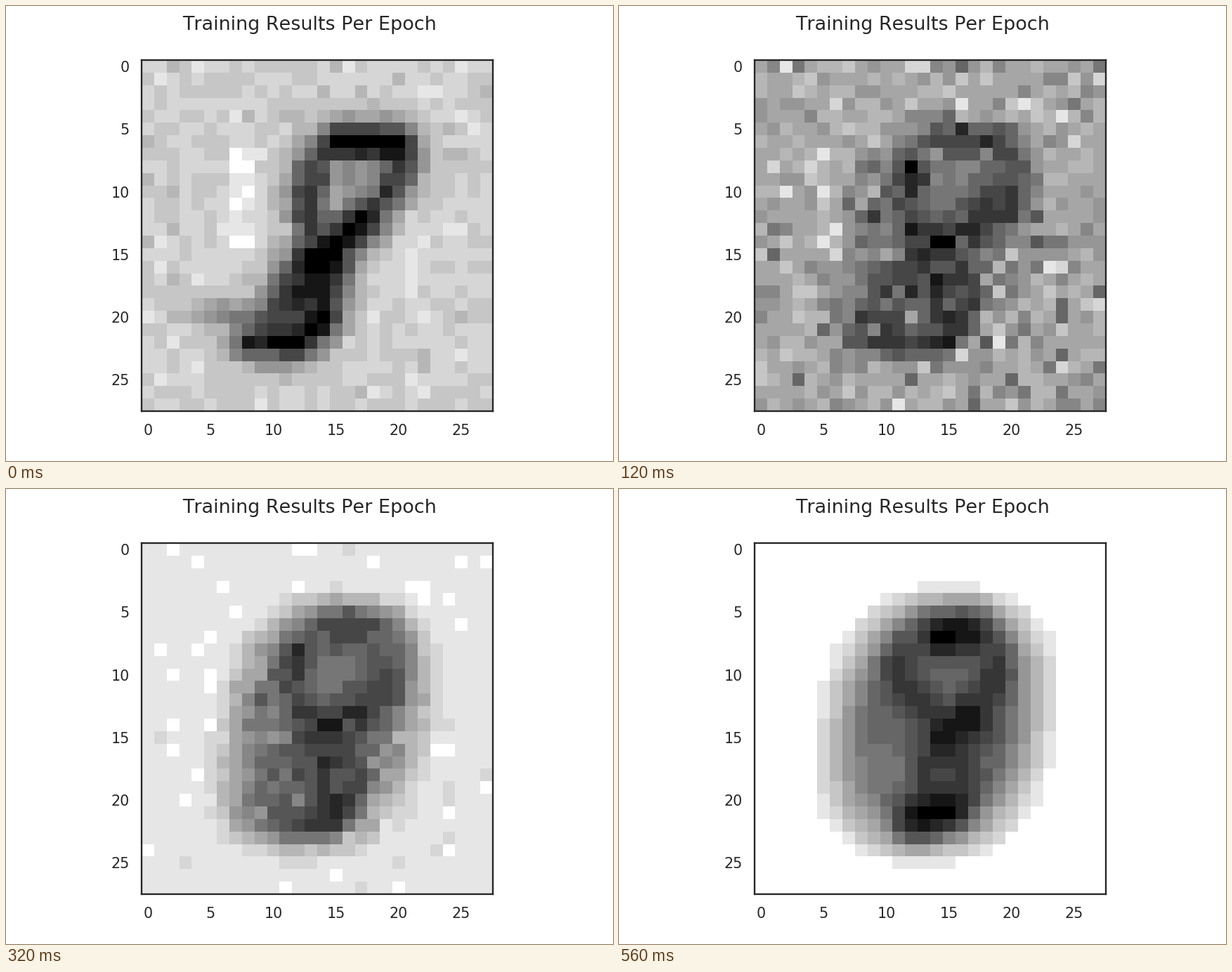
A matplotlib script that plays this animation: 864x648 px, repeating every 600 ms.

```python
import numpy as np
import matplotlib.pyplot as plt
from matplotlib.animation import FuncAnimation

SIZE = 28
FRAMES = 15
STAGE = 864, 648
INK = "#262626"
Y, X = np.mgrid[0:SIZE, 0:SIZE].astype(float)


def stroke(path, width, amp):
    """Soft line through the points of path; a negative amp lightens."""
    dist = np.full(X.shape, np.inf)
    for (x0, y0), (x1, y1) in zip(path, path[1:] or path):
        dx, dy = x1 - x0, y1 - y0
        t = ((X - x0) * dx + (Y - y0) * dy) / max(dx * dx + dy * dy, 1e-9)
        t = np.clip(t, 0, 1)
        dist = np.minimum(dist, np.hypot(X - x0 - t * dx, Y - y0 - t * dy))
    return amp * np.exp(-(dist / width) ** 2)


def eight(cx, lean, top, bottom, height=8):
    """Path of a leaning 8 with loops of half widths top and bottom."""
    t = np.linspace(0, 2 * np.pi, 49)
    s = np.sin(2 * t)
    y = -height * np.cos(t)
    half = np.where(y < 0, top, bottom)
    x = cx + lean * y + half * np.sign(s) * np.abs(s) ** 0.6
    return list(zip(x, 14 + y))


def draw(*strokes):
    """Blend dark strokes with a soft maximum, then take the light ones away."""
    layers = [stroke(*s) for s in strokes]
    dark = sum(np.maximum(s, 0) ** 3 for s in layers) ** (1 / 3)
    return dark + sum(np.minimum(s, 0) for s in layers)


def body(lean, a, b=11.4):
    """Leaning rounded blob, 1 inside and fading out towards its rim."""
    dx = X - 14 - lean * (Y - 14)
    rho = (np.abs(dx / a) ** 2.6 + np.abs((Y - 14) / b) ** 2.6) ** (1 / 2.6)
    return np.clip(2.33 * (1 - rho), 0, 1)


def grain(seed):
    """Cell noise with long tails, so that a few cells stand out."""
    g = np.random.default_rng(seed).normal(size=X.shape)
    return np.clip(g * (0.7 + 0.25 * g * g), -3.2, 3.2)


def sharp_digit():
    digit = draw(
        (eight(14.3, -0.4, 3.4, 1.8), 1.8, 9),
        ([(15.5, 6), (20, 6.2)], 1.5, 12),
        ([(17, 12.5), (13.5, 15.5)], 1.9, 11),
        ([(13.5, 16), (12.8, 19)], 2.5, 10),
        ([(14, 20.5), (11.5, 22), (8, 22)], 1.5, 10),
        ([(5, 19.8), (9, 19.8)], 1.2, 5),
        ([(16.5, 9)], 2, 4),
        ([(7.7, 7), (7.4, 14)], 1.1, -2),
        ([(21, 14.5), (21, 17.5)], 1.3, -1.1),
    )
    return 2.5 + digit + 0.45 * grain(4)


def rough_digit():
    blob = body(-0.15, 9.3)
    digit = draw(
        (eight(13.6, -0.3, 3.5, 2.3), 1.6, 5.5),
        ([(17.4, 5), (18, 7)], 1.7, 8),
        ([(11, 14), (16, 13.5)], 1.6, 7.5),
        ([(14, 16), (12, 18)], 2.2, 7),
        ([(8, 22.2), (13.5, 22)], 1.6, 8),
    )
    return 2.9 + 3 * blob + digit + (0.55 + 0.6 * blob) * grain(9)


EARLY = draw(
    (eight(14.3, -0.3, 4.2, 3), 1.6, 3.2),
    ([(16, 5.4), (20, 6.4)], 1.5, 4.4),
    ([(13, 15), (16, 13.5)], 1.5, 4.5),
    ([(14.5, 17), (14.2, 21.5)], 1.2, 5),
    ([(7.5, 21.8), (14, 22.2)], 1.4, 4.5),
)
MEAN = draw(
    (eight(14.8, -0.05, 4.1, 1.4), 1.6, 3),
    ([(14.3, 6.3), (17, 6.2)], 2, 7.4),
    ([(14.8, 14.8), (16.6, 13.6)], 1.9, 5),
    ([(12.3, 22), (14.9, 21.1)], 1.9, 7.4),
    ([(9.8, 17.5)], 2.2, -1.4),
)
SHARED = grain(21)


def trained(age, base, fill, back_noise, ink_noise):
    """Digit during training; age runs from 0 to 1."""
    blob = body(-0.2 + 0.09 * age, 8.9 + 0.8 * age)
    digit = EARLY + (MEAN - EARLY) * age
    noise = back_noise + (ink_noise - back_noise) * blob
    edge = np.minimum(1, 4 * blob)
    return base + fill * blob + digit * edge + noise * SHARED


KEYS = {
    0: sharp_digit(),
    2: rough_digit(),
    3: trained(0, 4.8, 3.2, 1.3, 1.2),
    5: trained(0.05, 2.9, 5, 0.75, 0.9),
    7: trained(0.3, 1.2, 6.5, 0.4, 0.8),
    10: trained(0.65, 0, 8.4, 0, 0.5),
    14: trained(1, 0, 9, 0, 0),
}
KEYS = {k: np.clip(v, 0, 15) for k, v in KEYS.items()}


def shades(i):
    """Grey values of one epoch in sixteen steps."""
    lo = max(k for k in KEYS if k <= i)
    hi = min(k for k in KEYS if k >= i)
    t = (i - lo) / max(hi - lo, 1)
    level = np.rint(KEYS[lo] * (1 - t) + KEYS[hi] * t)
    grey = 246 - 16 * level
    grey[level == 0] = 255
    grey[level == 15] = 0
    return grey


plt.rcParams.update({
    "font.family": "DejaVu Sans",
    "text.kerning_factor": 6,
    "text.color": INK,
    "axes.edgecolor": INK,
    "axes.linewidth": 1.25,
    "xtick.color": INK,
    "ytick.color": INK,
})

fig = plt.figure(figsize=(6.4, 4.8), dpi=135)
w, h = STAGE
ax = fig.add_axes([193.3 / w, 71.3 / h, 499.4 / w, 499.4 / h])
fig.suptitle("Training Results Per Epoch", x=0.5, y=0.9785, fontsize=14.4)
image = ax.imshow(shades(0), cmap="gray", vmin=0, vmax=255,
                  interpolation="nearest", aspect="auto")
ax.set_xticks(range(0, SIZE, 5))
ax.set_yticks(range(0, SIZE, 5))
ax.tick_params(length=0, pad=9.5, labelsize=11)


def update(i):
    image.set_data(shades(i))
    return (image,)


anim = FuncAnimation(fig, update, frames=FRAMES, interval=40, repeat=True,
                     repeat_delay=0, blit=False)
plt.show()
```
